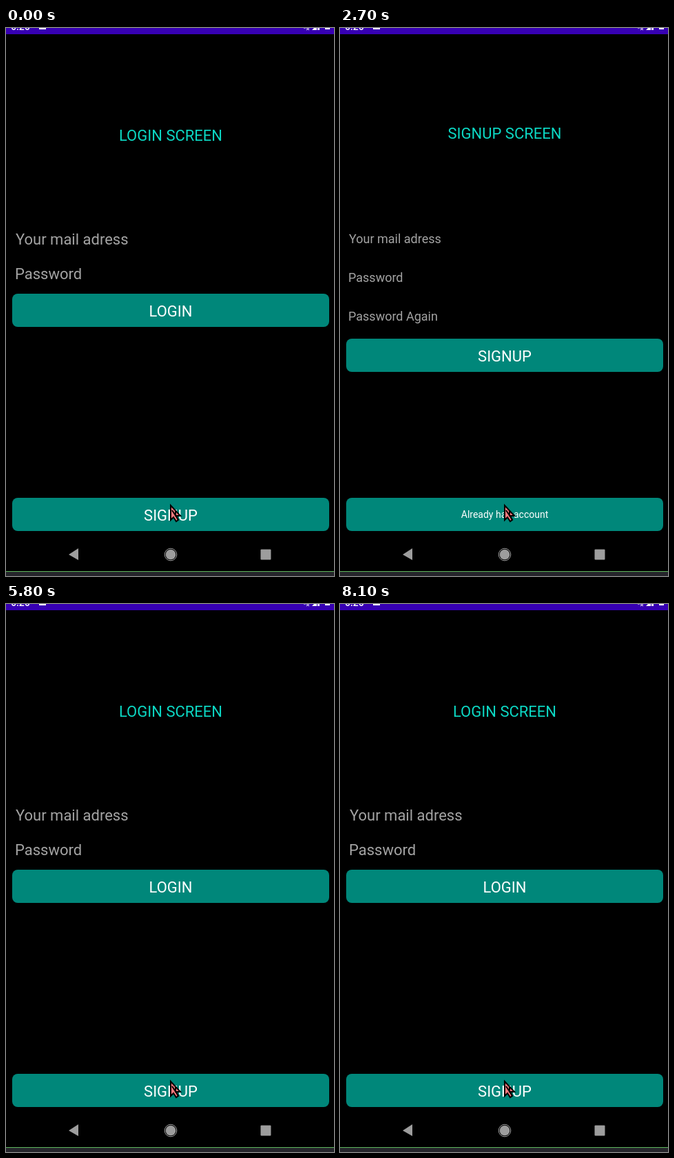
An HTML page that plays this animation: 476 by 792 pixels, repeating every 8400 ms.

```html
<!DOCTYPE html>
<html lang="en">
<head>
<meta charset="utf-8">
<title>Login and signup</title>
<style>
  html, body { margin: 0; width: 100%; height: 100%; overflow: hidden; background: #000; }
  svg { display: block; width: 100vw; height: 100vh; font-family: Roboto, sans-serif; }
  .title { font-size: 22px; fill: #0cd8c4; text-anchor: middle; }
  .label { font-size: 22px; fill: #fff; text-anchor: middle; }
  .note { font-size: 14px; fill: #fff; text-anchor: middle; }
  .hint { font-size: 22px; fill: #a3a3a3; }
  .small { font-size: 18px; }
  .button { fill: #00877a; }
  .button.pressed { fill: #08dac8; }
</style>
</head>
<body>
<svg viewBox="0 0 476 792">
  <rect width="476" height="792"/>

  <g id="login">
    <text class="title" x="239" y="163">LOGIN SCREEN</text>
    <text class="hint" x="14" y="313">Your mail adress</text>
    <text class="hint" x="13" y="363">Password</text>
    <rect class="button" x="9" y="384" width="460" height="48" rx="8"/>
    <text class="label" x="239" y="417">LOGIN</text>
    <rect class="button action" x="9" y="679" width="460" height="48" rx="8"/>
    <text class="label" x="239" y="712">SIGNUP</text>
  </g>

  <g id="signup">
    <text class="title" x="239" y="160">SIGNUP SCREEN</text>
    <text class="hint small" x="13" y="311">Your mail adress</text>
    <text class="hint small" x="12" y="367">Password</text>
    <text class="hint small" x="12" y="423">Password Again</text>
    <rect class="button" x="9" y="449" width="460" height="48" rx="8"/>
    <text class="label" x="239" y="482">SIGNUP</text>
    <rect class="button action" x="9" y="679" width="460" height="48" rx="8"/>
    <text class="note" x="239" y="708">Already has account</text>
  </g>

  <!-- status bar -->
  <rect width="476" height="9" fill="#3700b3"/>
  <g fill="#fff">
    <text x="7" y="3" font-size="14" font-weight="500">6:26</text>
    <path d="M48 0h10v2h-10zM444 3l7-7v7zM452 0h3v3h-3zM463 0h7v2h-7z"/>
    <path d="M436 0l4 3m0-3l-4 3M432 0h3" stroke="#fff" fill="none"/>
  </g>

  <!-- navigation bar -->
  <g fill="#9d9d9d">
    <path d="M91 761l14-9v17z"/>
    <circle cx="239" cy="761" r="7.3"/>
    <circle cx="239" cy="761" r="8.8" fill="none" stroke="#9d9d9d"/>
    <rect x="369.5" y="753.5" width="15" height="15" rx="1"/>
  </g>
  <rect y="785" width="476" height="1" fill="#5fb85f"/>
  <rect y="786" width="476" height="6" fill="#25252b"/>

  <!-- pointer -->
  <g stroke="#000" stroke-width="2">
    <path id="arrow" d="M239 690V711L243 707L247 713L250 711L247 705H253Z"/>
    <path id="shade" d="M241 697L247 706L250 711M246 698V706" fill="none"/>
  </g>
</svg>
<script>
  const LOOP = 8400, STEP = 100, SLIDE = 700, DISTANCE = 480;
  const slides = [
    { start: 2037, from: 0, to: 1 },
    { start: 3930, from: 1, to: 0 },
    { start: 5909, from: 0, to: 1 },
    { start: 7430, from: 1, to: 0 }
  ];
  const presses = [[1800, 2000], [3800, 4000], [5700, 5800], [7200, 7300]];

  const $ = id => document.getElementById(id);
  const actions = document.querySelectorAll('.action');

  // cubic-bezier(0.4, 0, 0.2, 1), solved by bisection
  function ease(x) {
    let low = 0, high = 1, s = 0.5;
    for (let i = 0; i < 20; i++) {
      s = (low + high) / 2;
      const at = 1.2 * s * (1 - s) ** 2 + 0.6 * s * s * (1 - s) + s ** 3;
      if (at < x) low = s; else high = s;
    }
    return s * s * (3 - 2 * s);
  }

  function pageAt(t) {
    let page = 0;
    for (const { start, from, to } of slides) {
      if (t < start) break;
      const x = (t - start) / SLIDE;
      page = x > 0.94 ? to : from + (to - from) * ease(x);
    }
    return page;
  }

  function draw(now) {
    const t = Math.floor(now % LOOP / STEP) * STEP;
    const page = pageAt(t);
    const pressed = presses.some(([down, up]) => t >= down && t < up);
    const resting = page === 0 || page === 1;

    $('login').setAttribute('transform', `translate(${-DISTANCE * page})`);
    $('signup').setAttribute('transform', `translate(${DISTANCE * (1 - page)})`);
    actions.forEach(button => button.classList.toggle('pressed', pressed));
    $('arrow').setAttribute('fill', pressed ? '#dc2b36' : '#ff7b80');
    $('shade').setAttribute('visibility', resting ? 'visible' : 'hidden');
  }

  function tick() {
    draw(performance.now());
    requestAnimationFrame(tick);
  }
  tick();
</script>
</body>
</html>
```
